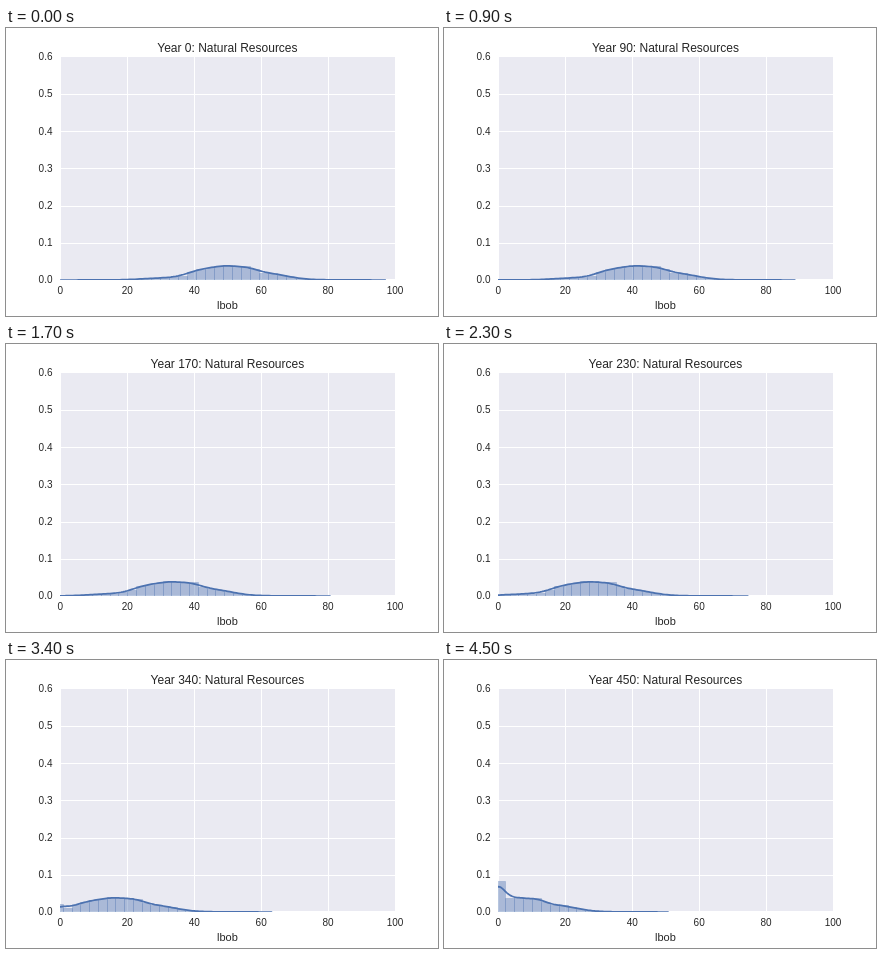
Animation of 432x288 px, one loop 4.6 s. Source, as an HTML page:

```html
<!DOCTYPE html>
<html lang="en">
<head>
<meta charset="utf-8">
<title>Natural Resources</title>
<style>
  html, body { margin: 0; width: 100%; height: 100%; overflow: hidden; background: #fff; }
  svg { display: block; width: 432px; height: 288px; }
  text { font-family: "Liberation Sans", Arial, sans-serif; font-size: 10px; fill: #262626; }
  .mid { text-anchor: middle; }
  .end { text-anchor: end; }
  #grid { stroke: #fff; stroke-width: 1; }
  #bars { fill: #4c72b0; stroke: #4c72b0; stroke-width: 1; }
  #bars path { opacity: .4; }
  #curve { fill: none; stroke: #4c72b0; stroke-width: 1.75; stroke-linejoin: round; stroke-linecap: round; }
</style>
</head>
<body>
<svg viewBox="0 0 432 288">
  <clipPath id="plot"><rect x="54" y="28.8" width="334.8" height="223.2"/></clipPath>
  <rect x="54" y="29" width="335" height="222" fill="#eaeaf2"/>
  <g id="grid"></g>
  <g clip-path="url(#plot)">
    <g id="bars"></g>
    <path id="curve"/>
  </g>
  <g id="ticks"></g>
  <text id="title" class="mid" x="221.4" y="24" style="font-size:12px"></text>
  <text class="mid" x="221.4" y="281" style="font-size:11px">lbob</text>
</svg>
<script>
const STEP_MS = 100, STEPS = 46;
const MIN = 8.1, MAX = 89.3, DX = 0.1, BIN = 2.715;
const $ = id => document.getElementById(id);
const px = v => 54 + v * 3.348;
const py = d => 252 - d * 372;
const snap = v => Math.round(v) + 0.5;

// starting wealth density: [value, relative frequency]
const SHAPE = [[8, 0.1], [18, 0.3], [22, 1.5], [26, 4], [30, 5.5], [34, 7.5], [37, 12],
  [39, 22], [41, 29], [44, 32], [47, 36], [49, 42], [51, 38], [54, 35], [56.5, 39],
  [58.5, 27], [60.5, 19], [63, 19], [66, 14], [69, 8], [72, 3.3], [76, 1], [80, 0.4], [90, 0.1]];
// lower edge of the histogram once part of the population runs dry: [step, value]
const FLOOR = [[17, -1], [23, -1.8], [39, -1.8], [45, -0.6]];

function lerp(table, x) {
  if (x <= table[0][0]) return table[0][1];
  for (let i = 1; i < table.length; i++) {
    const [x0, y0] = table[i - 1], [x1, y1] = table[i];
    if (x <= x1) return y0 + (y1 - y0) * (x - x0) / (x1 - x0);
  }
  return table[table.length - 1][1];
}

const people = [];
for (let i = 0; MIN + (i + 0.5) * DX < MAX; i++) {
  const x = MIN + (i + 0.5) * DX;
  people.push({ x, w: lerp(SHAPE, x), floor: -2.1 + 3 * ((i * 0.618034) % 1) });
}
const total = people.reduce((sum, p) => sum + p.w, 0);
people.forEach(p => p.w /= total);

function build(step) {
  const shift = step - Math.min(0.5, step / 18);
  const pop = people.map(p => ({ v: Math.max(p.x - shift, p.floor), w: p.w }));
  const mean = pop.reduce((s, p) => s + p.w * p.v, 0);
  const sd = Math.sqrt(pop.reduce((s, p) => s + p.w * (p.v - mean) ** 2, 0));
  const bw = sd * Math.pow(1000, -0.2);
  const lo = Math.max(MIN - shift, lerp(FLOOR, step)), hi = MAX - shift;

  const count = Math.ceil((hi - lo) / BIN), width = (hi - lo) / count;
  const mass = new Array(count).fill(0);
  for (const p of pop) {
    const k = Math.floor((p.v - lo) / width);
    if (k >= 0 && k < count) mass[k] += p.w;
  }
  const bars = mass.map((m, k) => {
    const a = snap(px(lo + k * width)), b = snap(px(lo + (k + 1) * width));
    return `<path d="M${a} 252.5V${snap(py(m / width))}H${b}V252.5Z"/>`;
  }).join("");

  const from = Math.max(lo - 3 * bw, -2), to = hi + 3 * bw, points = [];
  for (let i = 0; i <= 127; i++) {
    const x = from + (to - from) * i / 127;
    let d = 0;
    for (const p of pop) {
      const z = (x - p.v) / bw;
      if (z * z < 25) d += p.w * Math.exp(-z * z / 2);
    }
    d /= bw * Math.sqrt(2 * Math.PI);
    points.push(px(x).toFixed(2) + " " + py(d).toFixed(2));
  }
  return { bars, curve: "M" + points.join("L") };
}

function drawAxes() {
  let grid = "", ticks = "";
  for (let i = 0; i <= 5; i++) {
    const x = px(i * 20);
    grid += `<path d="M${snap(x)} 28V252"/>`;
    ticks += `<text class="mid" x="${x + 0.3}" y="266">${i * 20}</text>`;
  }
  for (let i = 0; i <= 6; i++) {
    const y = py(i / 10);
    if (i % 6) grid += `<path d="M54 ${snap(y)}H389"/>`;
    ticks += `<text class="end" x="46.5" y="${Math.round(y + 3.4)}">${(i / 10).toFixed(1)}</text>`;
  }
  $("grid").innerHTML = grid;
  $("ticks").innerHTML = ticks;
}

const cache = [];
let shown = -1;
function show(step) {
  if (step === shown) return;
  shown = step;
  const pic = cache[step] || (cache[step] = build(step));
  $("bars").innerHTML = pic.bars;
  $("curve").setAttribute("d", pic.curve);
  $("title").textContent = `Year ${step * 10}: Natural Resources`;
}

drawAxes();
show(0);
const start = performance.now();
function tick() {
  const t = Math.max(0, performance.now() - start);
  show(Math.floor(t / STEP_MS) % STEPS);
  requestAnimationFrame(tick);
}
requestAnimationFrame(tick);
</script>
</body>
</html>
```
